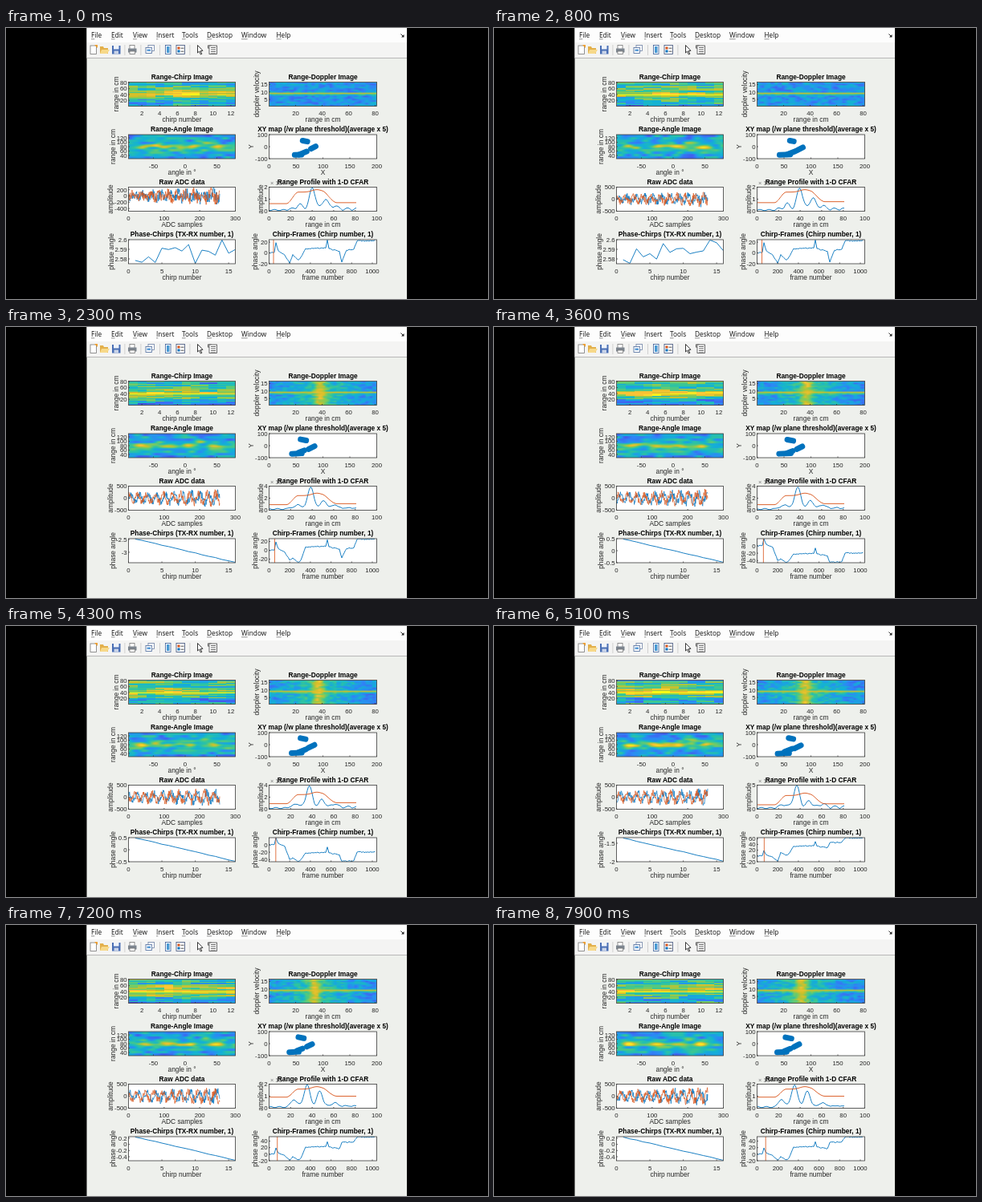
These frames come from a looping animation (600x338 px, 8000 ms). An HTML page with a canvas:

```html
<!DOCTYPE html>
<html lang="en">
<head>
<meta charset="utf-8">
<title>Radar plots</title>
<style>
html, body { margin: 0; width: 100%; height: 100%; overflow: hidden; background: #000; }
canvas { display: block; }
</style>
</head>
<body>
<canvas id="stage" width="600" height="338"></canvas>
<script>
const ctx = document.getElementById('stage').getContext('2d');
const BLUE = '#0072bd', ORANGE = '#d95319', INK = '#262626';
const SANS = '"Liberation Sans", Arial, sans-serif';
const LEFT = 152.5, RIGHT = 327.5, TOP = 67.5, PITCH = 65.5, H = 30;
const STEPS = 80, STEP_MS = 100;

// Colour map stops, dark blue to yellow
const MAP = ['3e26a8', '4752eb', '2e87f7', '12b1d6', '32c69b', '81cc59', 'd1bf27', 'fec338', 'f9fb15']
  .map(hex => [0, 2, 4].map(i => parseInt(hex.slice(i, i + 2), 16)));

// track: plateau levels; phase: high, low, tick gap, roughness
const USUAL = [-8, 8, 5, 22];
const STATES = [
  { at: 0, top: 2, track: USUAL, phase: [2.6, 2.575, 0.01, 1] },
  { at: 16, top: 2, track: USUAL, phase: [2.284, 2.224, 0.02, 0.3] },
  { at: 23, top: 4, track: [-22, 8, 4, 25], phase: [-2.47, -3.41, 0.5, 0.02] },
  { at: 36, top: 4, track: [-40, -22, -45, -20], phase: [0.5, -0.5, 0.5, 0.02] },
  { at: 51, top: 5, track: [8, 34, 46, 62], phase: [-1.35, -2, 0.5, 0.02] },
  { at: 63, top: 3, track: USUAL, phase: [-2.25, -3, 0.5, 0.3] },
  { at: 79, top: 2, track: [-12, 22, 36, 52], phase: [0.25, -0.53, 0.2, 0.02] }
];

const rnd = (a, b = 0, c = 0) => {
  const v = Math.sin(a * 127.1 + b * 311.7 + c * 74.7) * 43758.5453;
  return v - Math.floor(v);
};
const lerp = (a, b, f) => a + (b - a) * f;
const clamp = v => Math.max(0, Math.min(1, v));
const ease = v => (v = clamp(v)) * v * (3 - 2 * v);
const bell = (x, c, s) => Math.exp(-((x - c) ** 2) / (2 * s * s));
const drift = (x, a, b) => {
  const i = Math.floor(x);
  return lerp(rnd(i, a, b), rnd(i + 1, a, b), ease(x - i));
};
const nearest = step => STATES.reduce((a, b) => Math.abs(b.at - step) < Math.abs(a.at - step) ? b : a);

function ticks(lo, hi, gap, place) {
  const out = [];
  for (let i = Math.ceil(lo / gap - 1e-6); i * gap <= hi + 1e-6; i++) {
    const v = +(i * gap).toFixed(2);
    out.push([String(v), place(v)]);
  }
  return out;
}

function text(s, x, y, size = 7.8, align = 'center', color = INK, bold = false) {
  ctx.font = (bold ? 'bold ' : '') + size + 'px ' + SANS;
  ctx.textAlign = align;
  ctx.fillStyle = color;
  ctx.fillText(s, x, y);
}

function line(points, color, width = 0.9) {
  ctx.strokeStyle = color;
  ctx.lineWidth = width;
  ctx.beginPath();
  points.forEach(p => ctx.lineTo(p[0], p[1]));
  ctx.stroke();
}

function shape(points, color) {
  ctx.fillStyle = color;
  ctx.beginPath();
  points.forEach(p => ctx.lineTo(p[0], p[1]));
  ctx.fill();
}

function rect(x, y, w, h, color) {
  ctx.fillStyle = color;
  ctx.fillRect(x, y, w, h);
}

function sheet(x, y, w, h, edge) {
  rect(x, y, w, h, '#fff');
  ctx.strokeStyle = edge;
  ctx.lineWidth = 0.8;
  ctx.strokeRect(x, y, w, h);
}

// Axes box with ticks; draw paints the content
function plot(x, row, title, xLabel, yLabel, xTicks, yTicks, draw) {
  const y = TOP + row * PITCH, w = x === LEFT ? 133 : 134, mid = x + w / 2;
  rect(x, y, w, H, '#fff');
  ctx.save();
  ctx.beginPath();
  ctx.rect(x, y, w, H);
  ctx.clip();
  draw(x, y, w);
  ctx.restore();
  ctx.strokeStyle = '#3a3a3a';
  ctx.lineWidth = 0.8;
  ctx.strokeRect(x, y, w, H);
  ctx.beginPath();
  for (const [s, tx] of xTicks) {
    ctx.moveTo(tx, y + H);
    ctx.lineTo(tx, y + H - 1.5);
    text(s, tx, y + H + 11.8);
  }
  let widest = 0;
  for (const [s, ty] of yTicks) {
    ctx.moveTo(x, ty);
    ctx.lineTo(x + 1.5, ty);
    text(s, x - 1.8, ty + 2.8, 7.8, 'right');
    widest = Math.max(widest, ctx.measureText(s).width);
  }
  ctx.stroke();
  text(xLabel, mid, y + H + 19.8, 8.4);
  ctx.save();
  ctx.translate(x - 3.4 - widest, y + H / 2);
  ctx.rotate(-Math.PI / 2);
  text(yLabel, 0, 0, 8.4);
  ctx.restore();
  text(title, mid, y - 4, 8.35, 'center', '#000', true);
}

const cells = document.createElement('canvas');
const cctx = cells.getContext('2d');
function heat(cols, rows, fn, x, y, w, soft) {
  cells.width = cols;
  cells.height = rows;
  const img = cctx.createImageData(cols, rows);
  for (let r = 0, k = 0; r < rows; r++) {
    for (let c = 0; c < cols; c++) {
      const v = Math.min(0.999, clamp(fn(c, r))) * (MAP.length - 1);
      const i = Math.floor(v);
      for (let n = 0; n < 3; n++) img.data[k++] = lerp(MAP[i][n], MAP[i + 1][n], v - i);
      img.data[k++] = 255;
    }
  }
  cctx.putImageData(img, 0, 0);
  ctx.imageSmoothingEnabled = soft;
  ctx.drawImage(cells, x, y, w, H);
}

function menuBar() {
  rect(100.5, 0, 398.5, 18, '#fdfdfd');
  ctx.font = '8.3px "Open Sans", sans-serif';
  ctx.textAlign = 'left';
  const menu = { File: 106, Edit: 131, View: 158, Insert: 187, Tools: 219, Desktop: 250, Window: 293, Help: 336.5 };
  for (const name in menu) {
    ctx.fillStyle = '#111';
    ctx.fillText(name, menu[name], 12.4);
    rect(menu[name], 13.6, ctx.measureText(name[0]).width, 0.6, '#444');
  }
  line([[491.5, 7.5], [494.5, 10.5]], '#222', 1);
  shape([[495.5, 8], [495.5, 11.5], [492, 11.5]], '#222');
}

function toolBar() {
  rect(100.5, 18, 398.5, 19, '#f4f4f3');
  rect(100.5, 37, 398.5, 1, '#b8b8b8');
  sheet(105, 22, 7.5, 10.5, '#777');
  shape([[110, 21], [114, 21], [114, 25]], '#f0a030');
  shape([[117, 23], [121, 23], [122, 25], [127, 25], [127, 32], [117, 32]], '#e3b04b');
  shape([[119, 27], [129, 27], [126, 32], [117, 32]], '#f7d98a');
  rect(132, 22, 10.5, 10.5, '#4a6fb5');
  rect(134, 22, 6.5, 4.5, '#eef3fa');
  rect(134.5, 28.5, 5.5, 4, '#c9d4e8');
  sheet(154, 21.5, 6, 5, '#777');
  rect(152, 25.5, 10.5, 5, '#7d858f');
  sheet(154, 29, 6.5, 3.5, '#777');
  for (const x of [147.5, 167.5, 191, 228.5]) rect(x, 21, 0.8, 13, '#c8c8c8');
  sheet(177, 21.5, 7.5, 7, '#6b7fa3');
  sheet(174, 24.5, 7.5, 7, '#4c6a9c');
  rect(175.5, 26.5, 4.5, 2.5, '#5b9bd5');
  sheet(198.5, 21.5, 6.5, 11, '#3b5f9a');
  rect(200, 23, 3.5, 8, '#4a9ad4');
  sheet(212, 21.5, 10.5, 11, '#3d4f78');
  [ORANGE, BLUE].forEach((color, i) => {
    rect(213.5, 23.5 + i * 4, 3, 3, color);
    rect(217.5, 24.7 + i * 4, 4, 1, '#555');
  });
  const arrow = [[238.5, 21.5], [238.5, 31], [240.7, 29], [242.3, 33], [243.8, 32.3], [242.2, 28.6], [245, 28.3], [238.5, 21.5]];
  shape(arrow, '#fff');
  line(arrow, '#222', 0.9);
  sheet(251.5, 22, 4, 3, '#444');
  sheet(253, 22, 9.5, 10.5, '#444');
  for (let y = 24; y < 32; y += 2.5) rect(255, y, 6, 1, '#666');
}

const chirpImage = step => (x, y, w) => heat(12, 20, (c, r) => {
  const d = (1 - (r + 0.5) / 20) * 81;
  const shared = rnd(r, step, 1) - 0.5, own = rnd(r, Math.floor((c + 2 * rnd(r)) / 2), step + 9) - 0.5;
  return 0.42 + 0.45 * bell(d, 39, 2.5) + 0.24 * bell(d, 46, 14) - 0.08 * bell(d, 4, 8)
    + 0.2 * shared + 0.36 * own + 0.1 * (rnd(c, step, 3) - 0.5);
}, x, y, w, false);

const dopplerImage = step => (x, y, w) => heat(48, 16, (c, r) => {
  const px = x + (c + 0.5) * w / 48, center = lerp(395, 383, step / 79);
  const glow = 0.36 * ease((step - 8) / 14);
  const v = 0.29 + glow * 0.2 + 0.26 * (drift(c / 1.6, r, step) - 0.5)
    + glow * (0.8 * bell(px, center, 5) + 0.3 * bell(px, center, 28) - 0.25 * clamp(Math.abs(px - center) / 70));
  return lerp(v, 0.82, 0.85 * bell(r, 7.2, 0.5));
}, x, y, w, true);

const angleImage = step => (x, y, w) => heat(67, 20, (c, r) => {
  const px = x + (c + 0.5) * w / 67, py = y + (r + 0.5) * H / 20;
  let v = 0.14 + 0.36 * drift(c / 5 + 3 * rnd(r >> 1), r >> 1, step) + 0.12 * bell(py, 149, 5);
  for (let i = 0; i < 7; i++) {
    const main = i % 2 === 0;
    const sx = 167 + i * 15 + 6 * drift(step / 8, i, 2), sy = main ? 148.5 : 141 + 15 * rnd(i, 3);
    v += ((main ? 0.32 : 0.12) + 0.2 * drift(step / 6, i, 5)) * bell(px, sx, 6) * bell(py, sy, 1.6);
  }
  return v;
}, x, y, w, true);

const cloud = step => () => {
  const left = -4 * step / 79;
  const blob = (x, y, reach, tilt, seed) => {
    const cx = x + left + 3 * (drift(step / 5, seed, 1) - 0.5), cy = y + 2 * (drift(step / 5, seed, 2) - 0.5);
    const r = reach * (0.7 + 0.6 * drift(step / 7, seed, 3));
    line([[cx - r, cy - r * tilt], [cx + r, cy + r * tilt]], BLUE, 7);
  };
  ctx.lineCap = 'round';
  blob(372, 140.5, 3.2, 0.2, 1);
  blob(381.5, 150, 3.5, -0.5, 2);
  blob(363, 158.5, 6, -0.05, 3);
  blob(370, 155.5, 4, -0.4, 4);
  ctx.lineCap = 'butt';
};

const rawData = (step, zero) => x => [BLUE, ORANGE].forEach((color, n) => {
  const wave = lerp(3.5, 6, ease(step / 23)), noise = lerp(14, 9.5, ease(step / 10));
  const pts = [];
  for (let i = 0; i <= 256; i++) {
    const s = Math.sin(i / 256 * 2 * Math.PI * 10.5 + n * 1.6 + step * 0.4);
    const grow = 0.75 + 0.35 * i / 256;
    pts.push([x + i * 133 / 300, zero + grow * (wave * s + (rnd(i, step, n) - 0.5) * noise)]);
  }
  line(pts, color, 0.7);
});

const profile = (step, top) => (left, y) => {
  const scale = H / top, base = lerp(0.63, 0.92, ease(step / 23)), rise = 0.75 + 0.42 * top - base;
  const peak = lerp(381.5, 374, step / 79), signal = [], limit = [];
  for (let x = 328; x <= 436; x++) {
    const ripple = 1.5 + Math.sin(x * 0.55 + step) * 0.7 + 2 * ease((x - 346) / 8) * Math.abs(Math.sin(x * 0.27));
    const side = base * scale * 1.35;
    const h = ripple + 26 * bell(x, peak, 3.7) + side * bell(x, peak + 16, 3.4)
      + 0.45 * side * bell(x, peak - 16, 3.2) + 4 * bell(x, 409, 3.5);
    const hill = ease((x - 349) / 15) * ease((412 - x) / 18);
    signal.push([x, y + H - h]);
    limit.push([x, y + H - base * scale - hill * (rise * scale + 3 * bell(x, 387, 6)) - 1.2 * ease((x - 400) / 12)]);
  }
  line(signal, BLUE);
  line(limit, ORANGE);
};

const phaseCurve = (step, rough) => (x, y) => {
  const fall = 1 - 1.5 * rough, vs = [];
  for (let c = 1; c <= 16; c++) vs.push(fall * (c - 1) / 15 + rough * (rnd(c, step, 7) - 0.5));
  const lo = Math.min(...vs), span = Math.max(...vs) - lo;
  line(vs.map((v, i) => [x + (i + 1) * 8.31, y + 0.5 + (v - lo) / span * (H - 1)]), BLUE);
};

// Key points of the long phase history, in radians
function trackKnots([dip, mid, hold, end]) {
  return [[328, 0], [334, 1], [336, 19], [339, 4], [347, -4], [353, Math.min(-19, dip)],
    [357, dip + 5], [364, dip - 5], [367, dip], [373, mid], [398, mid + 1], [400, mid + 16], [402, mid],
    [415, mid - 5], [418, hold < 30 ? Math.min(-17, hold) : hold], [424, hold], [433, hold + 2], [437, end], [461, end + 1]];
}

const trackCurve = (step, knots, place) => (x, y) => {
  const pts = [];
  knots.slice(1).forEach((b, i) => {
    const a = knots[i], n = Math.round((b[0] - a[0]) / 1.5);
    for (let j = 0; j < n; j++) {
      const wobble = j ? 1.4 * (rnd(i, j) - 0.5) : 0;
      pts.push([lerp(a[0], b[0], j / n), place(lerp(a[1], b[1], j / n)) + wobble]);
    }
  });
  line(pts, BLUE);
  const now = 333 + 5.2 * step / 79;
  line([[now, y], [now, y + H]], ORANGE, 0.8);
};

function render(step) {
  const { top, track, phase: [high, low, gap, rough] } = nearest(step);
  rect(0, 0, 600, 338, '#000');
  rect(100.5, 0, 398.5, 338, '#eef0ec');
  menuBar();
  toolBar();

  plot(LEFT, 0, 'Range-Chirp Image', 'chirp number', 'range in cm',
    ticks(2, 12, 2, v => LEFT + (v - 0.5) * 11.08), ticks(20, 80, 20, v => 97.5 - v * 0.365), chirpImage(step));
  plot(RIGHT, 0, 'Range-Doppler Image', 'range in cm', 'doppler velocity',
    ticks(20, 80, 20, v => RIGHT + v * 1.65), ticks(5, 15, 5, v => 97.5 - (v - 0.5) * 1.87), dopplerImage(step));
  plot(LEFT, 1, 'Range-Angle Image', 'angle in °', 'range in cm',
    ticks(-50, 50, 50, v => 223 + v * 0.79), ticks(40, 120, 20, v => 159 - (v - 40) * 0.275), angleImage(step));
  plot(RIGHT, 1, 'XY map (/w plane threshold)(average x 5)', 'X', 'Y',
    ticks(0, 200, 50, v => RIGHT + v * 0.67), ticks(-100, 100, 100, v => 148 - v * 0.15), cloud(step));

  const wide = step >= 8, zero = wide ? 213.5 : 209.5;
  const rawTicks = wide ? ticks(-500, 500, 500, v => zero - v * 0.03) : ticks(-400, 200, 200, v => zero - v * 0.039);
  plot(LEFT, 2, 'Raw ADC data', 'ADC samples', 'amplitude',
    ticks(0, 300, 100, v => LEFT + v * 133 / 300), rawTicks, rawData(step, zero));
  text('× 10', 329, 196, 7.4, 'left', '#777');
  text('4', 345.5, 193, 5.5, 'left', '#777');
  plot(RIGHT, 2, 'Range Profile with 1-D CFAR', 'range in cm', 'amplitude',
    ticks(0, 100, 20, v => RIGHT + v * 1.34),
    ticks(0, top, top < 3 ? 1 : top < 5 ? 2 : 5, v => 228.5 - v * H / top), profile(step, top));

  plot(LEFT, 3, 'Phase-Chirps (TX-RX number, 1)', 'chirp number', 'phase angle',
    ticks(0, 15, 5, v => LEFT + v * 8.31),
    ticks(low, high, gap, v => 264 + (high - v) / (high - low) * H), phaseCurve(step, rough));
  const knots = trackKnots(track), levels = knots.map(k => k[1]);
  const max = Math.max(...levels) + 0.5, min = Math.min(...levels) - 1;
  const place = v => 264 + (max - v) / (max - min) * H;
  plot(RIGHT, 3, 'Chirp-Frames (Chirp number, 1)', 'frame number', 'phase angle',
    ticks(0, 1000, 200, v => RIGHT + v * 0.1285), ticks(min, max, 20, place), trackCurve(step, knots, place));
}

let shown = -1;
function tick() {
  const step = Math.floor(performance.now() / STEP_MS) % STEPS;
  if (step !== shown) render(shown = step);
  requestAnimationFrame(tick);
}
tick();
</script>
</body>
</html>
```
